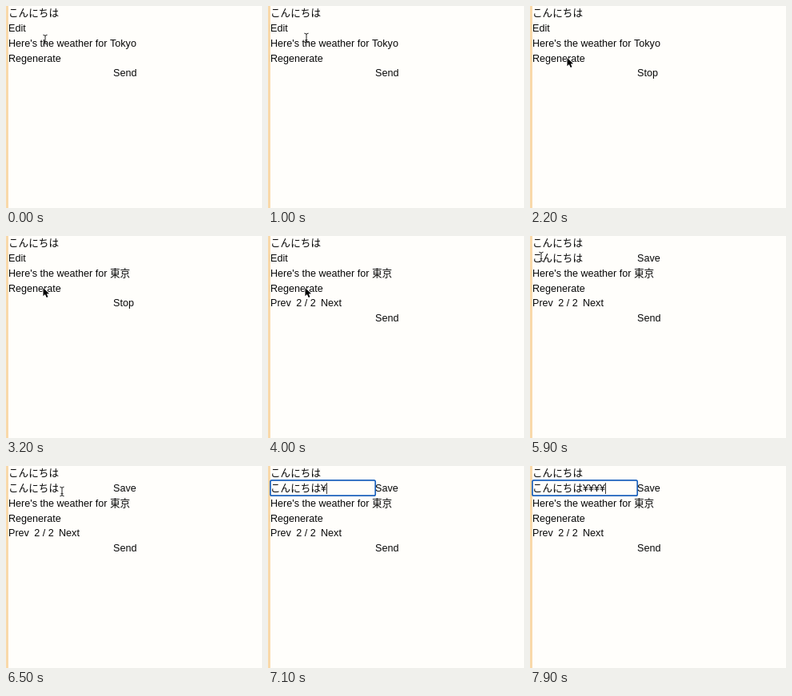
Animation of 320 by 253 pixels, one loop 8000 ms. Source, as an HTML page with a canvas:

```html
<!DOCTYPE html>
<html lang="ja">
<head>
<meta charset="utf-8">
<title>Chat thread</title>
<style>
  html, body { margin: 0; width: 100%; height: 100%; overflow: hidden; background: #fffefb; }
  canvas { display: block; width: 320px; height: 253px; }
</style>
</head>
<body>
<canvas id="stage"></canvas>
<script>
const W = 320, H = 253, LOOP = 8000, STEP = 100;
const ROW = 18.8, LEFT = 3, RIGHT = 134, GAP = 6.3;
const PAPER = "#fffefb", INK = "#080808";
const GREETING = "こんにちは";
const REPLY = "Here's the weather for ";

const canvas = document.getElementById("stage");
const ratio = window.devicePixelRatio || 1;
canvas.width = W * ratio;
canvas.height = H * ratio;
const ctx = canvas.getContext("2d");

const pointerStart = { x: 49, y: 42 };
const moves = [
  { from: 0, to: 300, x: 48, y: 40 },
  { from: 1000, to: 1500, x: 46.5, y: 65 },
  { from: 4600, to: 5100, x: 28, y: 34.5 },
  { from: 5100, to: 5500, x: 14, y: 26 },
  { from: 6100, to: 6500, x: 70, y: 32 }
];

const ramp = (t, from, to) => Math.min(1, Math.max(0, (t - from) / (to - from)));
const smooth = u => u * u * (3 - 2 * u);

function pointerAt(t) {
  let { x, y } = pointerStart;
  for (const move of moves) {
    const u = smooth(ramp(t, move.from, move.to));
    x += (move.x - x) * u;
    y += (move.y - y) * u;
  }
  return { x, y };
}

function replyAt(t) {
  if (t < 3000) return REPLY + "Tokyo";
  const words = (REPLY + "東京").split(" ");
  return words.slice(0, Math.ceil(words.length * ramp(t, 2900, 3200))).join(" ");
}

function yenAt(t) {
  if (t < 7100) return "";
  const typed = 1 + 6 * ramp(t, 7200, 7500);
  const erased = (t >= 7600 ? 1 : 0) + (t >= 7900 ? 2 : 0);
  return "¥".repeat(Math.round(typed) - erased);
}

// Draws a label and returns where it ends.
function write(text, x, row, lift = 0) {
  ctx.fillText(text, x, 13.2 + row * ROW - lift);
  return x + ctx.measureText(text).width;
}

function drawEditor(t) {
  const focused = t >= 6700;
  if (focused) {
    ctx.fillStyle = PAPER;
    ctx.strokeStyle = "#1c62bd";
    ctx.lineWidth = 1.7;
    ctx.beginPath();
    ctx.roundRect(3, 17.8, 131.2, 19.4, 1.8);
    ctx.fill();
    ctx.stroke();
    ctx.fillStyle = INK;
  }
  const end = write(yenAt(t), write(GREETING, LEFT, 1, 0.5), 1);
  write("Save", RIGHT, 1);
  if (focused) ctx.fillRect(end + 0.2, 21, 0.8, 14);
}

function drawArrow(x, y) {
  ctx.save();
  ctx.translate(x, y);
  const outline = new Path2D("M0 0V10.2L2.4 8 4.2 12 6 11.2 4.3 7.4 7.5 7.2Z");
  ctx.lineJoin = "round";
  ctx.strokeStyle = "#fff";
  ctx.lineWidth = 1.6;
  ctx.stroke(outline);
  ctx.fillStyle = "#000";
  ctx.fill(outline);
  ctx.restore();
}

function drawBeam(x, y) {
  ctx.beginPath();
  for (const s of [-1, 1]) {
    ctx.moveTo(x - 2.6, y + 5.8 * s);
    ctx.quadraticCurveTo(x, y + 5.8 * s, x, y + 4.2 * s);
    ctx.quadraticCurveTo(x, y + 5.8 * s, x + 2.6, y + 5.8 * s);
  }
  ctx.moveTo(x, y - 4.5);
  ctx.lineTo(x, y + 4.5);
  ctx.moveTo(x - 1.4, y + 2.6);
  ctx.lineTo(x + 1.4, y + 2.6);
  ctx.strokeStyle = "#222";
  ctx.lineWidth = 1;
  ctx.stroke();
}

function drawPointer(t) {
  if (t >= 7100) return;
  const { x, y } = pointerAt(t);
  const overText = t >= 5900 || (y > 38 && y < 57);
  (overText ? drawBeam : drawArrow)(x, y);
}

function draw(t) {
  const running = t >= 2000 && t < 3700;
  const branched = t >= 3700;

  ctx.setTransform(ratio, 0, 0, ratio, 0, 0);
  ctx.fillStyle = PAPER;
  ctx.fillRect(0, 0, W, H);
  ctx.fillStyle = "#f9d9aa";
  ctx.fillRect(0, 0, 3, H);

  ctx.font = '300 12.6px "Liberation Sans", "Noto Sans CJK JP", "Noto Sans CJK", sans-serif';
  ctx.fillStyle = INK;
  write(GREETING, LEFT, 0, 0.7);
  if (t < 5900) write("Edit", LEFT, 1);
  else drawEditor(t);
  write(replyAt(t), LEFT, 2);
  write("Regenerate", LEFT, 3);
  if (branched) {
    let x = LEFT;
    for (const label of ["Prev", "2 / 2", "Next"]) x = write(label, x, 4) + GAP;
  }
  write(running ? "Stop" : "Send", RIGHT, branched ? 5 : 4);
  drawPointer(t);
}

const began = performance.now();
function tick() {
  const t = (performance.now() - began) % LOOP;
  draw(Math.floor(t / STEP) * STEP);
  requestAnimationFrame(tick);
}
tick();
</script>
</body>
</html>
```
